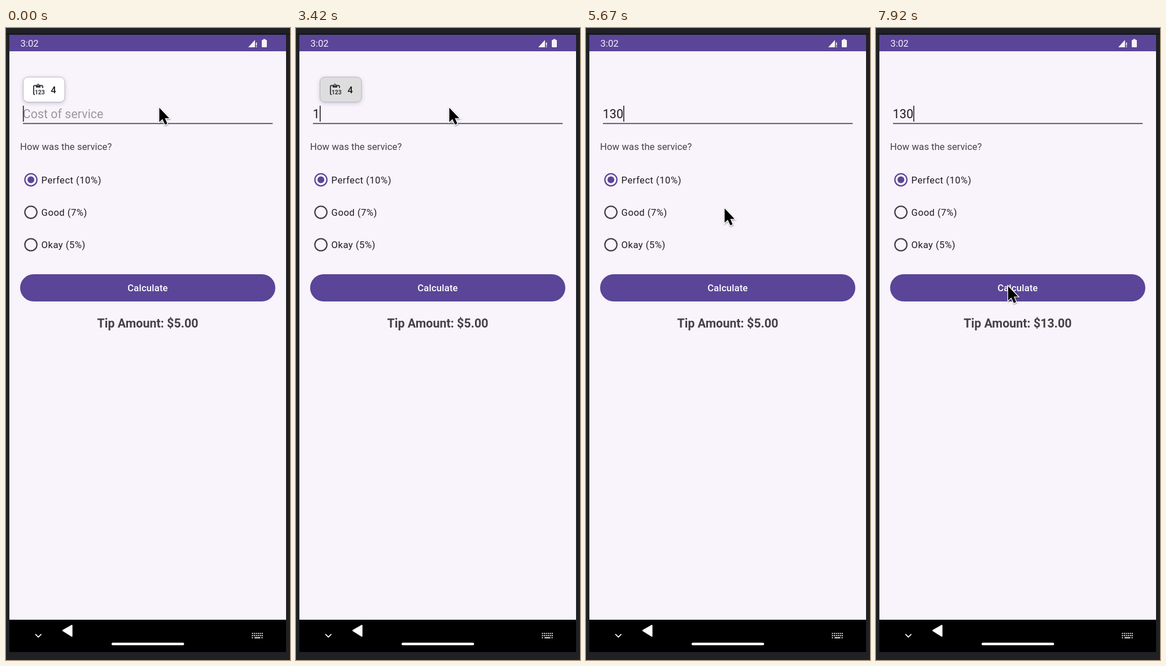
An HTML page for the animation above (8000 ms loop, 503 px wide and 1114 px high).

```html
<!DOCTYPE html>
<html lang="en">
<head>
<meta charset="utf-8">
<title>Tip calculator</title>
<style>
html, body { margin: 0; width: 100%; height: 100%; overflow: hidden; background: #202125; }
svg { display: block; width: 503px; height: 1114px; }
text { font: 16.69px Roboto, sans-serif; fill: #1d1b20; white-space: pre; }
.field { font-size: 21.45px; }
.option { letter-spacing: .46px; }
.mid { text-anchor: middle; }
.medium { font-weight: 500; }
.line { fill: none; stroke-linecap: round; stroke-linejoin: round; }
</style>
</head>
<body>
<svg viewBox="0 0 503 1114">
  <defs>
    <clipPath id="pill"><rect x="25" y="434" width="452" height="48" rx="24"/></clipPath>
    <radialGradient id="glow">
      <stop offset="0" stop-color="#fff"/>
      <stop offset=".5" stop-color="#fff" stop-opacity=".9"/>
      <stop offset="1" stop-color="#fff" stop-opacity="0"/>
    </radialGradient>
    <filter id="soft" x="-40%" y="-40%" width="180%" height="200%">
      <feDropShadow dx="0" dy="2" stdDeviation="3" flood-color="#48405a" flood-opacity=".25"/>
    </filter>
    <filter id="drop" x="-60%" y="-40%" width="240%" height="200%">
      <feDropShadow dx="0.5" dy="1.5" stdDeviation="1.3" flood-color="#000" flood-opacity=".4"/>
    </filter>
  </defs>

  <!-- device frame -->
  <rect width="503" height="1114" fill="#202125"/>
  <path d="M0 10.5H503" stroke="#151619" stroke-width="2"/>
  <rect x="6" y="12" width="490" height="1088" fill="#f9f3fb"/>

  <!-- status bar -->
  <rect x="6" y="12" width="490" height="29" fill="#5a4598"/>
  <text x="25.5" y="32.6" style="fill:#f5f0fa">3:02</text>
  <g fill="#f5f0fa">
    <path d="M429 34 441 21V34Z"/>
    <path d="M442.6 25.5h1.8v5.5h-1.8zM442.6 32.2h1.8v1.8h-1.8z"/>
    <path d="M455.5 19.5h4V21h1.5q1 0 1 1V33q0 1-1 1h-7q-1 0-1-1V22q0-1 1-1h1.5z"/>
  </g>

  <!-- form -->
  <text id="value" class="field" x="29.8" y="159"></text>
  <path d="M30 168.3H472.3" stroke="#4a4452" stroke-width="1.8"/>
  <rect id="caret" y="137" width="1.9" height="28" fill="#39363d"/>
  <text x="25" y="215" style="fill:#444148;letter-spacing:.07px">How was the service?</text>
  <g id="options"></g>
  <rect x="25" y="434" width="452" height="48" rx="24" fill="#5a4598"/>
  <g id="ripple" clip-path="url(#pill)">
    <circle id="wave" cx="245" cy="458" fill="url(#glow)"/>
    <g id="sparks" fill="#fff"></g>
  </g>
  <text class="mid medium" x="251" y="464.4" style="fill:#fff;letter-spacing:.16px">Calculate</text>
  <text id="tip" class="field mid" x="251" y="528.3" style="fill:#444148;font-weight:700"></text>

  <!-- paste suggestion -->
  <g id="chip">
    <rect id="chipBox" x="30.5" y="86.5" width="73.5" height="44" rx="8.5" stroke="#bab5c3" filter="url(#soft)"/>
    <path class="line" d="M50.5 117.3Q49 117.3 49 115.8V103Q49 101.5 50.5 101.5H63.5Q65 101.5 65 103V105" stroke="#37343b" stroke-width="1.9"/>
    <path d="M53 100.5H55Q55.3 98 57 98T59 100.5H61V105H53Z" fill="#37343b"/>
    <circle cx="57" cy="100.6" r=".9" fill="#fff"/>
    <text x="51" y="116.7" style="font-size:10.5px;font-weight:700;fill:#37343b;letter-spacing:-.2px">123</text>
    <text class="medium" x="79.3" y="115.3">4</text>
  </g>

  <!-- navigation bar -->
  <rect x="6" y="1043" width="490" height="57"/>
  <path class="line" d="M52.5 1068.8 57.3 1073.6 62.1 1068.8" stroke="#fff" stroke-width="1.7"/>
  <path d="M101 1062 116.5 1053.2V1071.8Z" fill="#fff" stroke="#fff" stroke-width="2.4" stroke-linejoin="round"/>
  <rect x="187" y="1083.5" width="128.5" height="4.6" rx="2.3" fill="#fff"/>
  <g stroke="#e8e8e8" stroke-width="2">
    <path d="M435.5 1067.3H455M435.5 1071H455" stroke-dasharray="2 1.45"/>
    <path d="M435.5 1074.8h2M440 1074.8h10.5M452.5 1074.8h2"/>
  </g>

  <path id="pointer" d="M0 0V25.2L5.6 19.9 10.1 29.7 14.2 27.9 10 18.4H17.6Z" stroke="#fff" stroke-width="2.4" paint-order="stroke" filter="url(#drop)"/>
</svg>
<script>
const $ = id => document.getElementById(id);
const set = (el, attrs) => { for (const k in attrs) el.setAttribute(k, attrs[k]); return el; };
const add = (parent, tag, attrs) =>
  parent.appendChild(set(document.createElementNS('http://www.w3.org/2000/svg', tag), attrs));
const clamp = v => Math.max(0, Math.min(1, v));

const LOOP = 8000, FPS = 12, DIGIT = 12.04;
const TYPED = [3250, 4170, 4580];
const BLINKS = [420, 920, 1330, 1920, 2420, 2920, 3830, 4170, 5080, 5580, 6080, 6580, 7080, 7580];
const PRESS = 6750, RESULT = 6920;
// time, x, y
const PATH = [
  [5160, 271.5, 140.5], [5250, 265, 185], [5330, 256, 270], [5420, 250, 312],
  [5500, 250, 312], [5670, 245.5, 318], [5830, 244, 340], [6170, 237, 442],
  [6330, 235, 466], [6420, 235, 463], [7500, 235, 463], [7830, 234, 455]
];

['Perfect (10%)', 'Good (7%)', 'Okay (5%)'].forEach((label, i) => {
  const y = 267.6 + i * 57.2, color = i ? '#444148' : '#5a4598', g = $('options');
  add(g, 'circle', { cx: 44.1, cy: y, r: 10.7, fill: 'none', stroke: color, 'stroke-width': 2.3 });
  if (!i) add(g, 'circle', { cx: 44.1, cy: y, r: 6, fill: color });
  add(g, 'text', { class: 'option', x: 62.6, y: y + 6.3 }).textContent = label;
});

let seed = 7;
const rand = () => (seed = seed * 16807 % 2147483647) / 2147483647;
const sparks = Array.from({ length: 420 }, () => {
  const x = 25 + rand() * 452, y = 434 + rand() * 48;
  const el = add($('sparks'), 'rect', { x, y, width: 1, height: 1 });
  return { el, dist: Math.hypot(x - 245, y - 458), shine: rand() };
});

function pointerAt(t) {
  const i = PATH.findIndex(p => p[0] > t);
  if (i === 0) return PATH[0].slice(1);
  if (i < 0) return PATH[PATH.length - 1].slice(1);
  const [a, b] = [PATH[i - 1], PATH[i]], k = (t - a[0]) / (b[0] - a[0]);
  return [a[1] + (b[1] - a[1]) * k, a[2] + (b[2] - a[2]) * k];
}

function drawRipple(t) {
  const age = t - PRESS, on = age >= 0 && age < 800;
  $('ripple').style.display = on ? '' : 'none';
  if (!on) return;
  const radius = 135 + 190 * clamp(age / 450), fade = 1 - clamp((age - 330) / 420);
  set($('wave'), { r: radius, opacity: .11 * fade });
  for (const s of sparks) {
    const near = clamp(1 - Math.abs(s.dist - radius + 30) / 40);
    s.el.setAttribute('opacity', near * s.shine * .4 * fade);
  }
}

function draw(t) {
  const count = TYPED.filter(at => t >= at).length;
  const value = $('value');
  value.textContent = count ? '130'.slice(0, count) : 'Cost of service';
  value.style.fill = count ? '#1d1b20' : '#9d96a0';

  const flips = BLINKS.filter(at => t >= at).length;
  set($('caret'), { x: 29.8 + DIGIT * count, visibility: flips % 2 ? 'hidden' : 'visible' });

  const grey = clamp((t - 3170) / 200);
  $('chip').style.display = t < 4830 ? '' : 'none';
  set($('chip'), { transform: `translate(${Math.round(DIGIT * count)} 0)` });
  set($('chipBox'), { fill: `rgb(${[34, 34, 33].map(d => Math.round(255 - d * grey))})` });

  $('tip').textContent = 'Tip Amount: $' + (t < RESULT ? '5.00' : '13.00');
  drawRipple(t);
  set($('pointer'), { transform: `translate(${pointerAt(t)})` });
}

function tick() {
  const step = Math.floor((performance.now() % LOOP + 4) * FPS / 1000) % (LOOP * FPS / 1000);
  draw(Math.round(step * 100 / FPS) * 10);
  requestAnimationFrame(tick);
}
tick();
</script>
</body>
</html>
```
